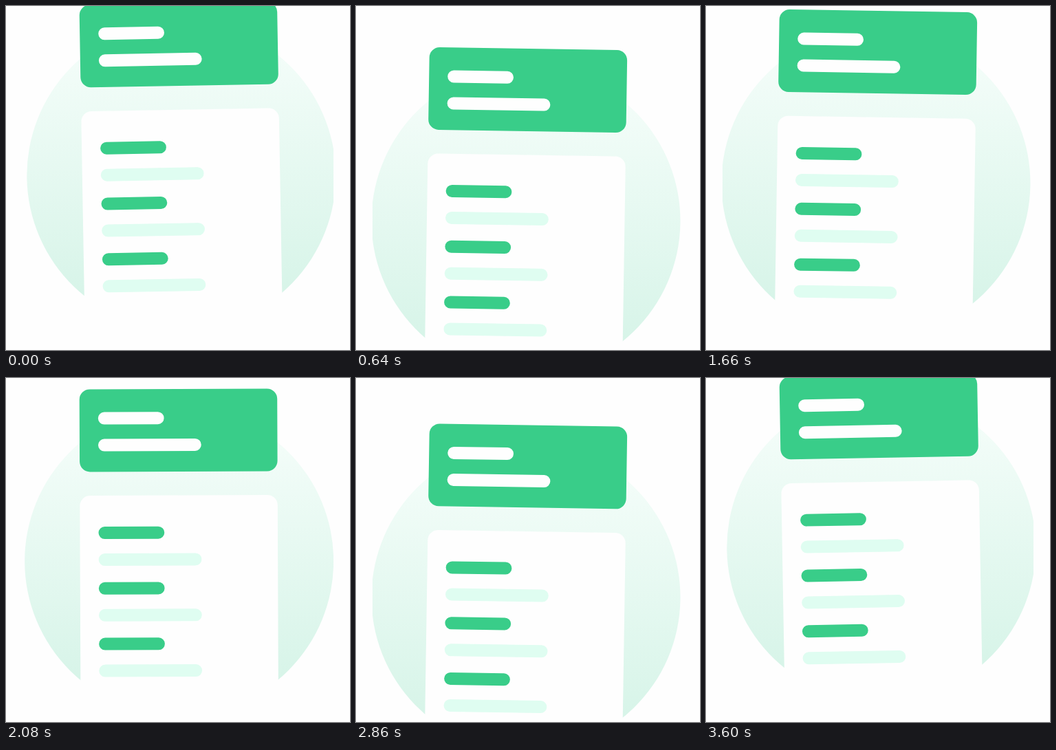
These frames come from a looping animation (500x500 px, 3.62 s). An HTML page:

```html
<!DOCTYPE html>
<html lang="en">
<head>
<meta charset="utf-8">
<title>Floating form</title>
<style>
  html, body { margin: 0; width: 100%; height: 100%; overflow: hidden; background: #fefefe; }
  svg { display: block; width: 100vw; height: 100vh; }
  .paper { fill: #fefefe; }
  .green { fill: #39cd89; }
  .pale { fill: #dffdf1; }
</style>
</head>
<body>
<svg viewBox="0 0 500 500">
  <defs>
    <linearGradient id="mint" x1="0" y1="0" x2="0" y2="1">
      <stop offset="0" stop-color="#f7fefb"/>
      <stop offset="1" stop-color="#d3f3e6"/>
    </linearGradient>
    <clipPath id="frame"><rect x="24" width="452" height="500"/></clipPath>
    <rect id="short" x="133.7" width="95.8" height="18" rx="9"/>
    <rect id="long" x="133.7" width="149.8" height="18" rx="9"/>
    <g id="row">
      <use href="#short" class="green"/>
      <use href="#long" class="pale" y="39"/>
    </g>
  </defs>
  <g clip-path="url(#frame)">
    <g id="form">
      <circle cx="250.7" cy="250.4" r="224.5" fill="url(#mint)"/>
      <rect class="paper" x="106.7" y="154.6" width="287.5" height="360" rx="15"/>
      <rect class="green" x="106.7" width="287.5" height="120" rx="15"/>
      <use href="#short" class="paper" y="33.2"/>
      <use href="#long" class="paper" y="72.2"/>
      <use href="#row" y="199.7"/>
      <use href="#row" y="280.5"/>
      <use href="#row" y="361.3"/>
    </g>
  </g>
</svg>
<script>
  const form = document.getElementById('form');
  const LOOP = 3620, CYCLE = 3600, TAU = 2 * Math.PI;
  const PIVOT_X = 24, PIVOT_Y = 12;

  // Two bobs and three swings per cycle
  const lift = t => 35.5 * (1 - Math.cos(TAU * (t + 10) / 1800));
  const tilt = t => {
    const u = TAU * t / CYCLE;
    return -0.03 - 1.03 * Math.cos(3 * u + 0.35) + 0.07 * Math.sin(2 * u);
  };

  function draw(now) {
    const t = Math.min(now % LOOP, CYCLE);
    form.setAttribute('transform',
      `translate(0 ${lift(t)}) rotate(${tilt(t)} ${PIVOT_X} ${PIVOT_Y})`);
  }

  const start = performance.now();
  function tick() {
    draw(performance.now() - start);
    requestAnimationFrame(tick);
  }
  tick();
</script>
</body>
</html>
```
